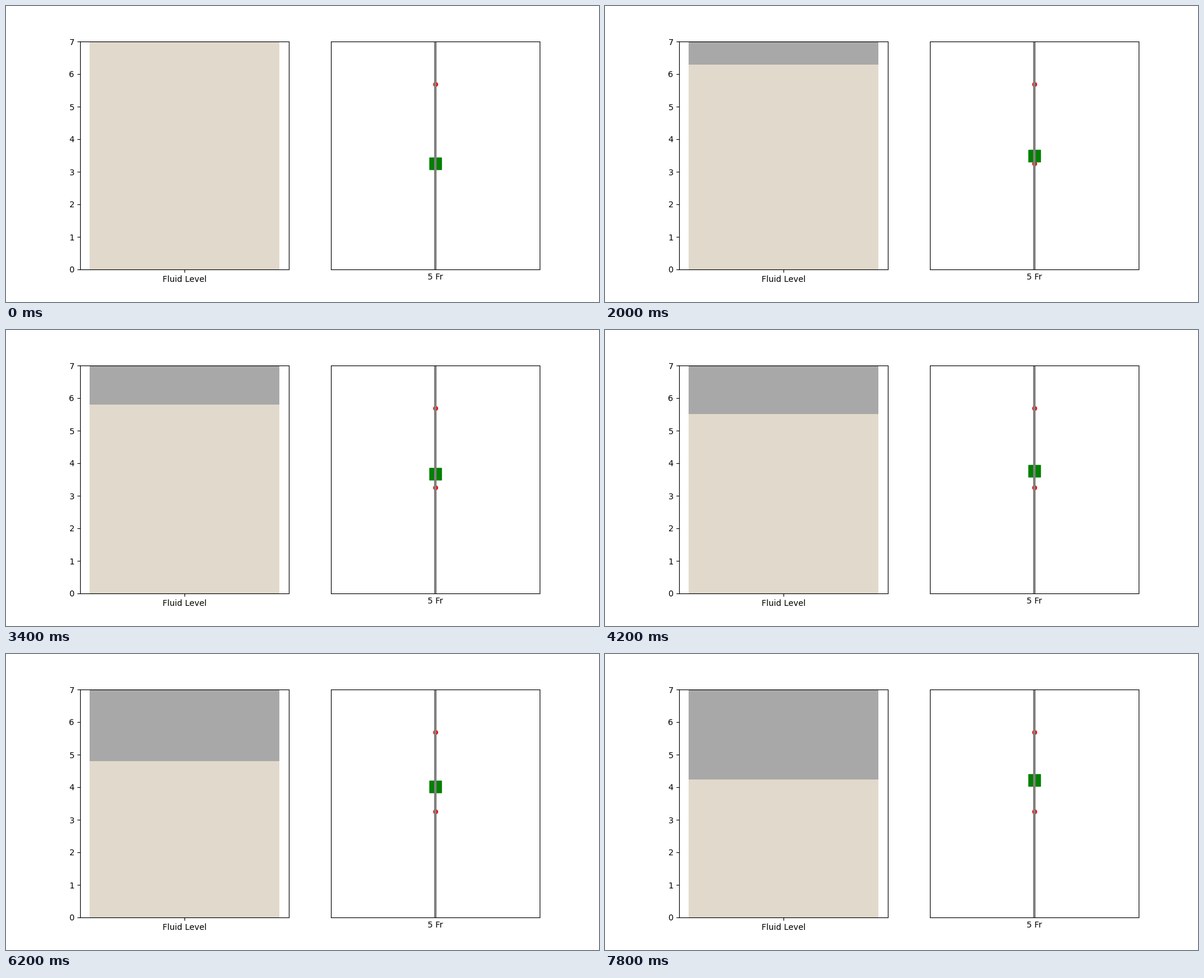
A matplotlib script for the animation above (8 s loop, 1000 by 500 pixels).

```python
import matplotlib.pyplot as plt
from matplotlib.animation import FuncAnimation

FRAMES = 40
INTERVAL = 200
FULL = 7.0
STEPS = 99  # steps for the tank to drain completely
LOW, HIGH = 3.252, 5.689  # ends of the float's travel

fig, (tank, rod) = plt.subplots(1, 2, figsize=(10, 5), dpi=100)

tank.bar(["Fluid Level"], [FULL], color="#a8a8a8")
fluid = tank.bar(["Fluid Level"], [FULL], color="#e1d9cc")[0]
tank.set_ylim(0, FULL)

rod.set_xlim(-1, 1)
rod.set_ylim(0, FULL)
rod.set_xticks([])
rod.set_yticks([])
rod.set_xlabel("5 Fr")
rod.plot([0, 0], [LOW, HIGH], "o", color="red", markersize=5)
slider, = rod.plot([0], [LOW], "s", color="green", markersize=15)
rod.plot([0, 0], [0, FULL], color="gray", linewidth=3)


def update(frame):
    drained = frame / STEPS
    fluid.set_height(FULL * (1 - drained))
    slider.set_ydata([LOW + (HIGH - LOW) * drained])
    return fluid, slider


anim = FuncAnimation(fig, update, frames=FRAMES, interval=INTERVAL,
                     repeat=True, repeat_delay=0)
plt.show()
```
